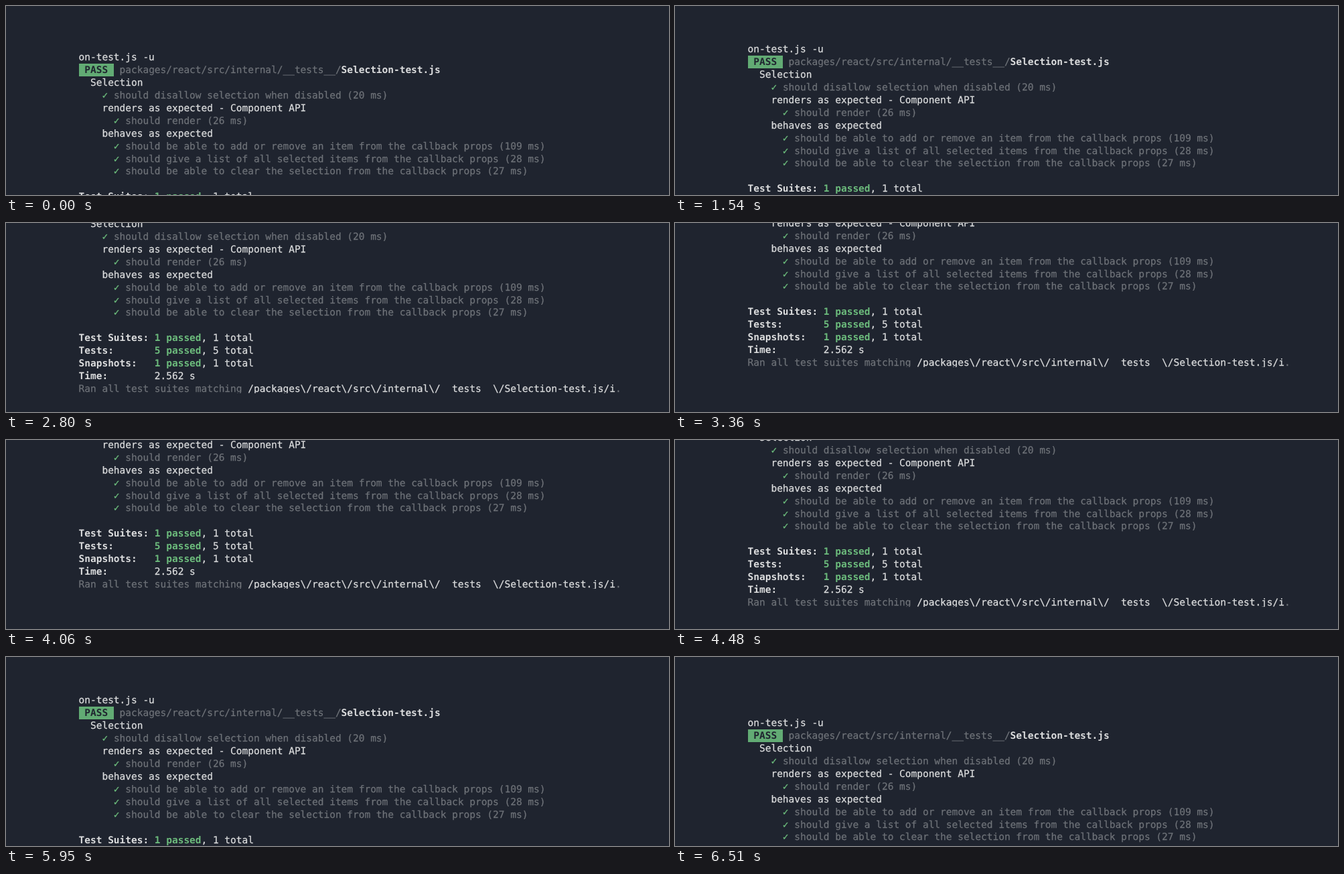
Write an HTML page that moves like this. It is 990 by 282 pixels and loops after 7560 ms.

```html
<!DOCTYPE html>
<html lang="en">
<head>
<meta charset="utf-8">
<title>Test run</title>
<style>
  html, body {
    margin: 0;
    width: 100%;
    height: 100%;
    overflow: hidden;
    background: #1f242f;
  }
  pre {
    position: absolute;
    left: 108.6px;
    top: 68px;
    width: 860px;
    height: 299px;
    margin: 0;
    overflow: hidden;
    white-space: pre;
    font: 14.48px/18.94px "DejaVu Sans Mono", monospace;
    text-rendering: geometricPrecision;
    -webkit-text-stroke: .25px;
    color: #dcddde;
    animation: scroll 7560ms infinite;
  }
  i { font-style: normal; color: #6e7278; }
  u { text-decoration: none; color: #6cbb7c; }
  b, mark { font-weight: 700; -webkit-text-stroke: 0; }
  mark {
    padding: 2px 0 1px;
    color: #1f242f;
    background: #62ab74;
  }

  /* Scroll bursts in 70 ms ticks, with rests between them */
  @keyframes scroll {
    0%       { margin-top: 0; }
    20.3703% { margin-top: 0;      animation-timing-function: steps(1, start); }
    21.2962% { margin-top: -12px;  animation-timing-function: steps(9, start); }
    29.6296% { margin-top: -70px;  animation-timing-function: steps(2, start); }
    31.4814% { margin-top: -77px; }
    34.2592% { margin-top: -77px;  animation-timing-function: steps(5, start); }
    38.8888% { margin-top: -122px; }
    39.8148% { margin-top: -122px; animation-timing-function: steps(6, start); }
    45.3703% { margin-top: -152px; }
    52.7777% { margin-top: -152px; animation-timing-function: steps(4, start); }
    56.4814% { margin-top: -138px; }
    58.3333% { margin-top: -138px; animation-timing-function: steps(2, start); }
    60.1851% { margin-top: -118px; animation-timing-function: steps(8, start); }
    67.5925% { margin-top: -40px;  animation-timing-function: steps(1, start); }
    68.5185% { margin-top: -32px;  animation-timing-function: steps(3, start); }
    71.2962% { margin-top: -16px; }
    78.7037% { margin-top: -16px;  animation-timing-function: steps(9, start); }
    87.0370% { margin-top: 22px; }
    100%     { margin-top: 22px; }
  }
</style>
</head>
<body>
<pre>on-test.js -u
<mark> PASS </mark> <i>packages/react/src/internal/__tests__/</i><b>Selection-test.js</b>
  Selection
    <u>✓</u> <i>should disallow selection when disabled (20 ms)</i>
    renders as expected - Component API
      <u>✓</u> <i>should render (26 ms)</i>
    behaves as expected
      <u>✓</u> <i>should be able to add or remove an item from the callback props (109 ms)</i>
      <u>✓</u> <i>should give a list of all selected items from the callback props (28 ms)</i>
      <u>✓</u> <i>should be able to clear the selection from the callback props (27 ms)</i>

<b>Test Suites: <u>1 passed</u></b>, 1 total
<b>Tests:       <u>5 passed</u></b>, 5 total
<b>Snapshots:   <u>1 passed</u></b>, 1 total
<b>Time:</b>        2.562 s
<i>Ran all test suites matching </i>/packages\/react\/src\/internal\/__tests__\/Selection-test.js/i<i>.</i></pre>
</body>
</html>
```
